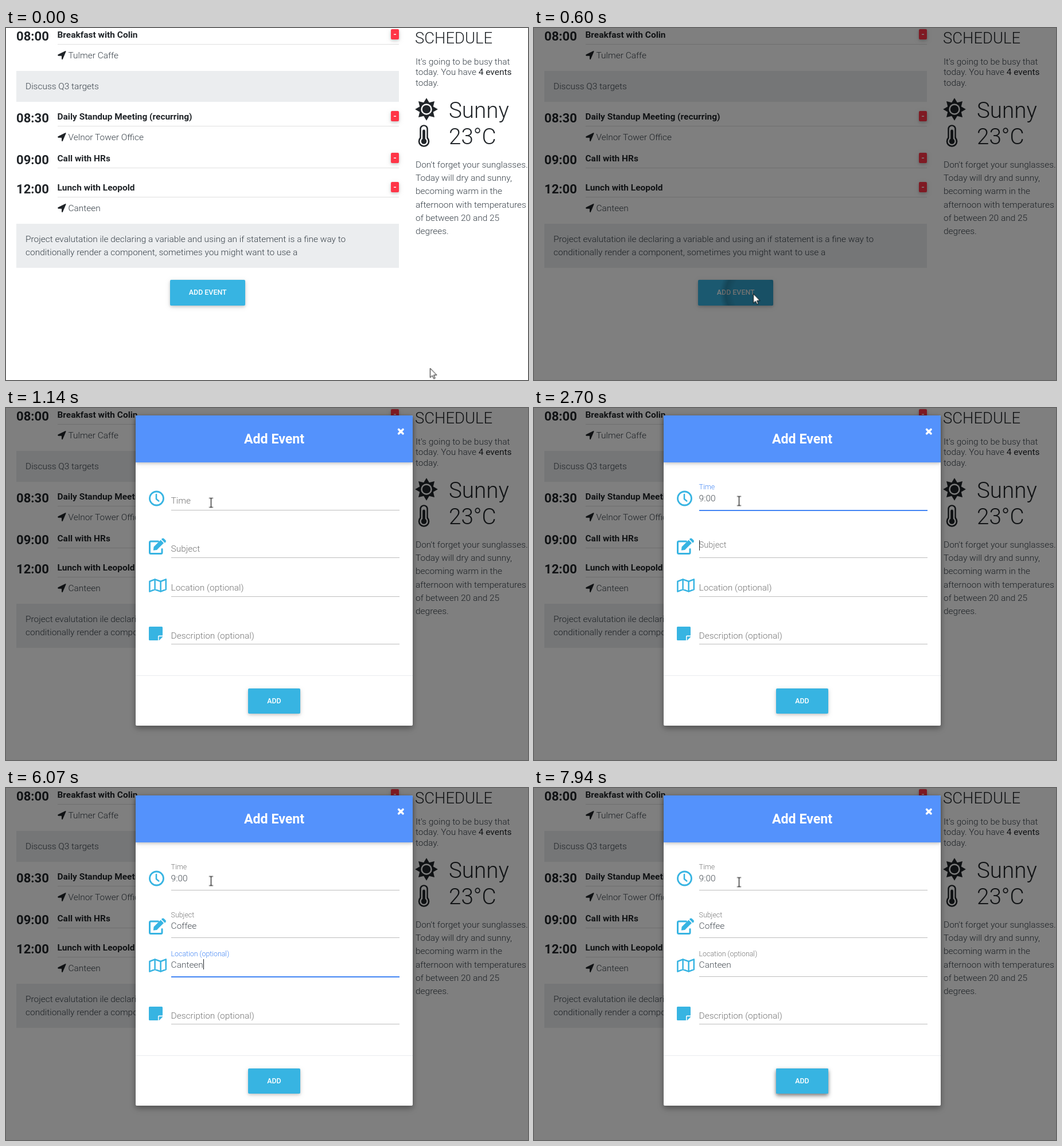
These frames come from a looping animation (910x615 px, 8000 ms). An HTML page:

```html
<!DOCTYPE html>
<html lang="en">
<head>
<meta charset="utf-8">
<title>Schedule</title>
<style>
  html, body { margin: 0; width: 100%; height: 100%; overflow: hidden; background: #fff; }
  svg { display: block; width: 910px; height: 615px; }
  text { font: 300 15.46px Roboto, sans-serif; fill: #39424a; white-space: pre; }
  .title, .time, .h, .big, .strong { fill: #212529; }
  .title { font-weight: 700; }
  .time { font-size: 22.1px; font-weight: 700; }
  .h { font-size: 27.4px; }
  .big { font-size: 38.6px; }
  .strong { font-weight: 400; }
  .btn { font-size: 12.4px; font-weight: 500; fill: #fff; text-anchor: middle; }
  .head { font-size: 23.2px; font-weight: 700; fill: #fff; text-anchor: middle; }
  .label { fill: #757575; }
  .value { fill: #495057; }
  .ink { fill: #212529; }
  .note { fill: #ebedef; }
  .blue { fill: #37b4e2; }
  .line { fill: none; stroke: #37b4e2; stroke-linejoin: round; stroke-linecap: round; }
  .raised { filter: drop-shadow(0 2px 2.5px rgba(0,0,0,.16)) drop-shadow(0 2px 5px rgba(0,0,0,.1)); }
  .panel { filter: drop-shadow(0 4px 5.5px rgba(0,0,0,.25)) drop-shadow(0 3px 5px rgba(0,0,0,.15)); }
  .lifted { filter: drop-shadow(0 4px 3.5px rgba(0,0,0,.35)); }

  #shade, #modal, #ripple, #cursor, #arrow, #beam, #lift { animation: 8s linear infinite; }
  #shade { animation-name: shade; }
  #modal { animation-name: fade, drop; }
  #ripple { animation-name: ripple; transform-origin: 382px 464px; }
  #cursor { animation-name: move; }
  #arrow { animation-name: arrow; }
  #beam { animation-name: beam; }
  #lift { animation-name: lift; }

  @keyframes shade { 0%, 5.5% { opacity: 0 } 7.375%, 100% { opacity: .5 } }
  @keyframes fade { 0%, 7.6% { opacity: 0 } 9.4%, 100% { opacity: 1 } }
  @keyframes drop {
    0%, 7.6% { transform: translateY(-135px); animation-timing-function: ease-out }
    11.25%, 100% { transform: none }
  }
  @keyframes ripple {
    0%, 5.4% { transform: scale(0) }
    7.5% { transform: scale(1) }
    9.5%, 100% { transform: scale(2) }
  }
  @keyframes move {
    0%, .8% { transform: translate(739.5px, 594.5px); animation-timing-function: ease-in-out }
    5.25%, 10.5% { transform: translate(382.5px, 464.5px); animation-timing-function: ease-in-out }
    13.75%, 15% { transform: translate(357.5px, 165.5px) }
    15.75%, 99.2% { transform: translate(357.5px, 162.5px); animation-timing-function: step-end }
    99.24%, 100% { transform: translate(357.5px, 164.5px) }
  }
  @keyframes arrow { 0% { opacity: 1; animation-timing-function: step-end } 13.25%, 100% { opacity: 0 } }
  @keyframes beam { 0% { opacity: 0; animation-timing-function: step-end } 13.25%, 100% { opacity: 1 } }
  @keyframes lift { 0%, 93.4% { opacity: 0 } 96%, 100% { opacity: 1 } }
</style>
</head>
<body>
<svg viewBox="0 0 910 615">
  <defs>
    <path id="pin" class="ink" d="M103.2 40.2Q105 39.6 104.4 41.4L98.9 54.4Q98 55.8 97 54.3V48.7H91Q89.3 47.8 90.8 46.3Z"/>
    <g id="minus">
      <rect class="raised" x="671" y="2" width="14" height="18" rx="2" fill="#ff3547"/>
      <rect x="676" y="10.5" width="4" height="1.5" fill="#fff"/>
    </g>
    <clipPath id="button"><rect x="286" y="440" width="131" height="45" rx="2"/></clipPath>
    <radialGradient id="wave">
      <stop offset=".6" stop-opacity=".1"/>
      <stop offset=".82" stop-opacity=".22"/>
      <stop offset="1" stop-opacity="0"/>
    </radialGradient>
  </defs>

  <rect width="910" height="615" fill="#fff"/>
  <g id="events"></g>

  <rect class="note" x="18" y="75" width="667" height="54"/>
  <text x="34" y="107">Discuss Q3 targets</text>
  <rect class="note" x="18" y="342" width="667" height="77"/>
  <text x="34" y="374">Project evalutation ile declaring a variable and using an if statement is a fine way to</text>
  <text x="34" y="397">conditionally render a component, sometimes you might want to use a</text>

  <rect class="blue raised" x="286" y="440" width="131" height="45" rx="2"/>
  <text class="btn" x="351.7" y="466">ADD EVENT</text>
  <g clip-path="url(#button)"><circle id="ripple" cx="382" cy="464" r="58" fill="url(#wave)"/></g>

  <text class="h" x="713" y="27">SCHEDULE</text>
  <text x="714" y="64">It's going to be busy that</text>
  <text x="714" y="82">today. You have <tspan class="strong">4 events</tspan></text>
  <text x="714" y="101">today.</text>
  <path id="sun" class="ink"/>
  <circle cx="733" cy="142" r="9.7" fill="#fff"/>
  <circle class="ink" cx="733" cy="142" r="7.3"/>
  <g id="thermo" fill="none" stroke-linecap="round"></g>
  <text class="big" x="772" y="157">Sunny</text>
  <text class="big" x="772" y="203">23°C</text>
  <g id="forecast"></g>

  <rect id="shade" width="910" height="615"/>

  <g id="modal">
    <rect class="panel" x="226" y="13" width="483" height="542" rx="2" fill="#fff"/>
    <path class="raised" d="M226 95V15q0-2 2-2H707q2 0 2 2V95Z" fill="#5492fc"/>
    <text class="head" x="467.5" y="62">Add Event</text>
    <path d="M684.6 37.4l7.4 7.4m0-7.4l-7.4 7.4" stroke="#fff" stroke-width="3.6" stroke-linecap="round"/>

    <circle class="line" cx="262.5" cy="158" r="12" stroke-width="2.8"/>
    <path class="line" d="M262 151v8l4.2 3.4" stroke-width="2.6"/>
    <path class="line" d="M265.5 233H252.5a2 2 0 0 0-2 2V252.5a2 2 0 0 0 2 2H270a2 2 0 0 0 2-2V246.5" stroke-width="3"/>
    <path class="blue" d="M256.8 248.7l.8-6.2 12-12 5.4 5.4-12 12zM270.8 229.2l1.4-1.2q1.7-1 3.2.3l2.8 2.8q1.3 1.5.2 3.2l-1.4 1.4z"/>
    <path class="line" d="M250.4 303l9.2-3.7 10 3.7 9.2-3.7V317l-9.2 3.7-10-3.7-9.2 3.7zM259.6 299.3V317M269.6 303V320.7" stroke-width="2.5"/>
    <path class="blue" d="M250.5 382H271.5Q273 382 273 383.5V397.5H266.5Q265 397.5 265 399V406H250.5Q249 406 249 404.5V383.5Q249 382 250.5 382ZM273 399.3v.6l-6 6h-.5v-6.6z"/>

    <g id="form"></g>

    <rect x="226" y="467" width="483" height="1" fill="#e9ecef"/>
    <rect id="lift" class="blue lifted" x="422" y="490" width="91" height="44" rx="2"/>
    <rect class="blue raised" x="422" y="490" width="91" height="44" rx="2"/>
    <text class="btn" x="467.5" y="516">ADD</text>
  </g>

  <g id="cursor">
    <path id="arrow" d="M0 0V16.3L3.8 12.8 6.3 18.3 8.6 17.3 6.2 11.9H11.4Z" fill="#fff" stroke="#000"/>
    <path id="beam" d="M-3.5-8h2.5q1 0 1 1 0-1 1-1h2.5M0-7V7M-3.5 8h2.5q1 0 1-1 0 1 1 1h2.5" fill="none" stroke="#000" stroke-width="1.2"/>
  </g>
</svg>

<script>
const LOOP = 8000;
const $ = id => document.getElementById(id);

const events = [
  { dy: 0, time: '08:00', title: 'Breakfast with Colin', place: 'Tulmer Caffe' },
  { dy: 143, time: '08:30', title: 'Daily Standup Meeting (recurring)', place: 'Velnor Tower Office' },
  { dy: 216, time: '09:00', title: 'Call with HRs' },
  { dy: 267, time: '12:00', title: 'Lunch with Leopold', place: 'Canteen' }
];
$('events').innerHTML = events.map(e => `
  <g transform="translate(0 ${e.dy})">
    <text class="time" x="18" y="22">${e.time}</text>
    <text class="title" x="89.5" y="17">${e.title}</text>
    <rect x="90" y="28" width="595" height="1" fill="#e0e0e0"/>
    <use href="#minus"/>
    ${e.place ? `<use href="#pin"/><text x="108.5" y="53">${e.place}</text>` : ''}
  </g>`).join('');

$('forecast').innerHTML = [
  "Don't forget your sunglasses.", 'Today will dry and sunny,', 'becoming warm in the',
  'afternoon with temperatures', 'of between 20 and 25', 'degrees.'
].map((s, i) => `<text x="714" y="${Math.round(244 + 23.2 * i)}">${s}</text>`).join('');

// Eight-pointed star
$('sun').setAttribute('d', 'M' + Array.from({ length: 16 }, (_, i) => {
  const r = i % 2 ? 12.7 : 19.8, a = i * Math.PI / 8;
  return `${733 + r * Math.cos(a)} ${142 + r * Math.sin(a)}`;
}).join('L') + 'Z');

// Nested tube and bulb: [tube width, tube top, bulb radius, colour]
$('thermo').innerHTML = [
  [14.5, 176.4, 9.8, '#212529'], [9.6, 176.4, 7.2, '#fff'], [4.8, 180, 4.8, '#212529']
].map(([w, top, r, c]) =>
  `<path d="M728.5 ${top}V198" stroke="${c}" stroke-width="${w}"/>
   <circle cx="728.5" cy="198" r="${r}" fill="${c}"/>`).join('');

const fields = [
  { name: 'Time', y: 178, base: 167, on: 1270, off: 2665, text: '9:00', keys: [1850, 2230, 2460, 2630] },
  { name: 'Subject', y: 261, base: 251, on: 2665, off: 4450, text: 'Coffee', keys: [3170, 3340, 3480, 3560, 3710, 3880] },
  { name: 'Location (optional)', y: 329, base: 319, on: 4450, off: 6650, text: 'Canteen', keys: [4900, 5050, 5450, 5600, 5750, 5920, 6070] },
  { name: 'Description (optional)', y: 412, base: 403, on: 6650, off: 7475, text: '', keys: [] }
];
$('form').innerHTML = fields.map(f => `
  <g>
    <rect x="288" y="${f.y}" width="398" height="1" fill="#bdbdbd"/>
    <rect x="288" y="${f.y}" width="398" height="2" fill="#4285f4"/>
    <text class="label">${f.name}</text>
    <text class="value" x="287.6" y="${f.y - 15}"></text>
    <rect y="${f.y - 30}" width="1" height="18" fill="#212529"/>
  </g>`).join('');
fields.forEach((f, i) => {
  [, f.glow, f.label, f.value, f.caret] = $('form').children[i].children;
});

const clamp = v => Math.min(1, Math.max(0, v));
const easeOut = p => 1 - (1 - clamp(p)) ** 1.7;
const mix = (a, b, p) => Math.round(a + (b - a) * p);

function drawField(f, t) {
  const tint = clamp((t - f.on - 40) / 80) - clamp((t - f.off - 40) / 80);
  const up = easeOut((t - f.on) / 200) - (f.text ? 0 : easeOut((t - f.off) / 200));
  f.glow.style.opacity = tint;
  f.label.setAttribute('transform', `translate(287.6 ${f.base - 25 * up}) scale(${1 - .2 * up})`);
  f.label.style.fill = `rgb(${mix(117, 66, tint)},${mix(117, 133, tint)},${mix(117, 244, tint)})`;

  const typed = f.keys.filter(k => k <= t).length;
  f.value.textContent = f.text.slice(0, typed);
  const last = typed ? f.keys[typed - 1] : f.on;
  const shown = t >= f.on && t < f.off && (t - last) % 1000 < 500;
  f.caret.style.opacity = shown ? 1 : 0;
  f.caret.setAttribute('x', 288 + (typed ? Math.round(f.value.getComputedTextLength() - .4) : 0));
}

let start;
function tick(now) {
  start ??= now;
  const t = (now - start) % LOOP;
  fields.forEach(f => drawField(f, t));
  requestAnimationFrame(tick);
}
requestAnimationFrame(tick);
</script>
</body>
</html>
```
